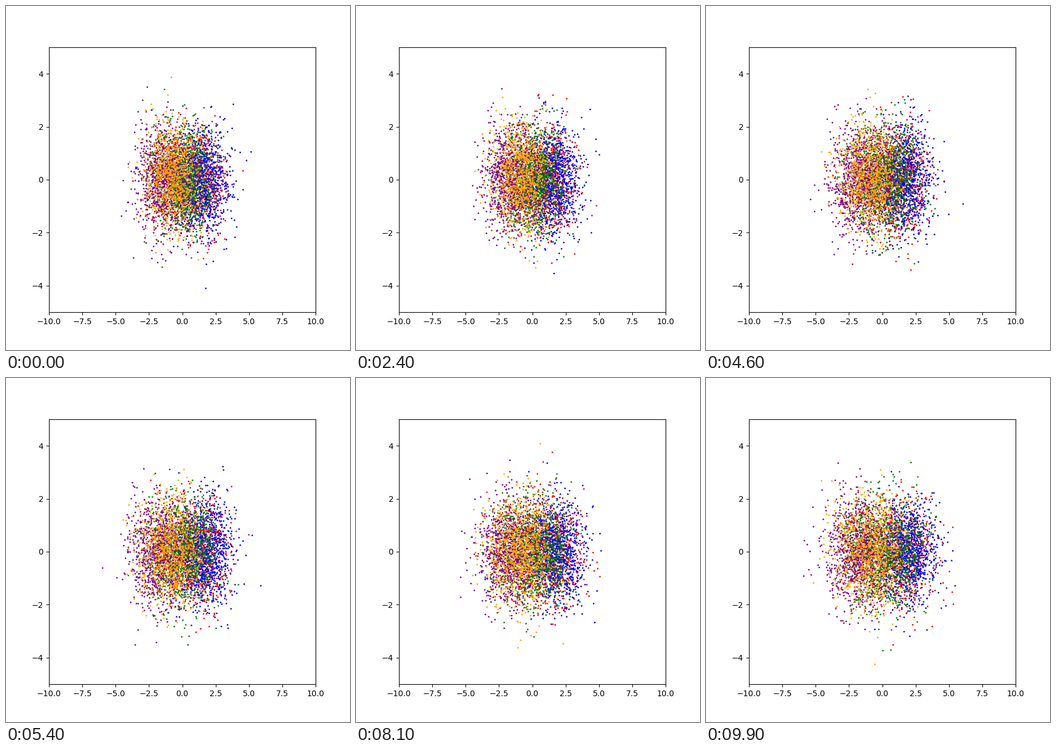
Write a matplotlib script that moves like this. It is 600 by 600 pixels and loops after 10000 ms.

```python
import numpy as np
import matplotlib.pyplot as plt
from matplotlib.animation import FuncAnimation

FRAMES = 100
COUNT = 1000
RATE = 0.02  # pull towards the mean per frame

# colour, starting mean in x, share of the widening spread
CLOUDS = [
    ("red", 0.85, 0.9),
    ("blue", 1.45, 0.5),
    ("green", 0.1, 1.0),
    ("purple", -1.5, 0.5),
    ("orange", -0.75, 0.85),
]

rng = np.random.default_rng(12)


def wander():
    """Stationary random walk with unit variance, one row per frame."""
    keep = 1 - RATE
    kick = np.sqrt(1 - keep**2)
    steps = np.empty((FRAMES, COUNT, 2))
    steps[0] = rng.standard_normal((COUNT, 2))
    for i in range(1, FRAMES):
        steps[i] = keep * steps[i - 1] + kick * rng.standard_normal((COUNT, 2))
    return steps


def make_paths(mean, share):
    t = np.linspace(0, 1, FRAMES)[:, None]
    side = rng.uniform(-1.7, 1.7, COUNT)
    paths = wander()
    paths[:, :, 0] += mean * (1 + 0.3 * t) + share * side * (0.4 + 0.7 * t)
    return paths


fig, ax = plt.subplots(figsize=(6, 6), dpi=100)
ax.set_xlim(-10, 10)
ax.set_ylim(-5, 5)

paths = [make_paths(mean, share) for _, mean, share in CLOUDS]
dots = [ax.plot([], [], "o", color=color, markersize=1)[0]
        for color, _, _ in CLOUDS]


def update(i):
    for dot, path in zip(dots, paths):
        dot.set_data(path[i, :, 0], path[i, :, 1])
    return dots


anim = FuncAnimation(fig, update, frames=FRAMES, interval=100,
                     repeat=True, repeat_delay=0)
plt.show()
```
